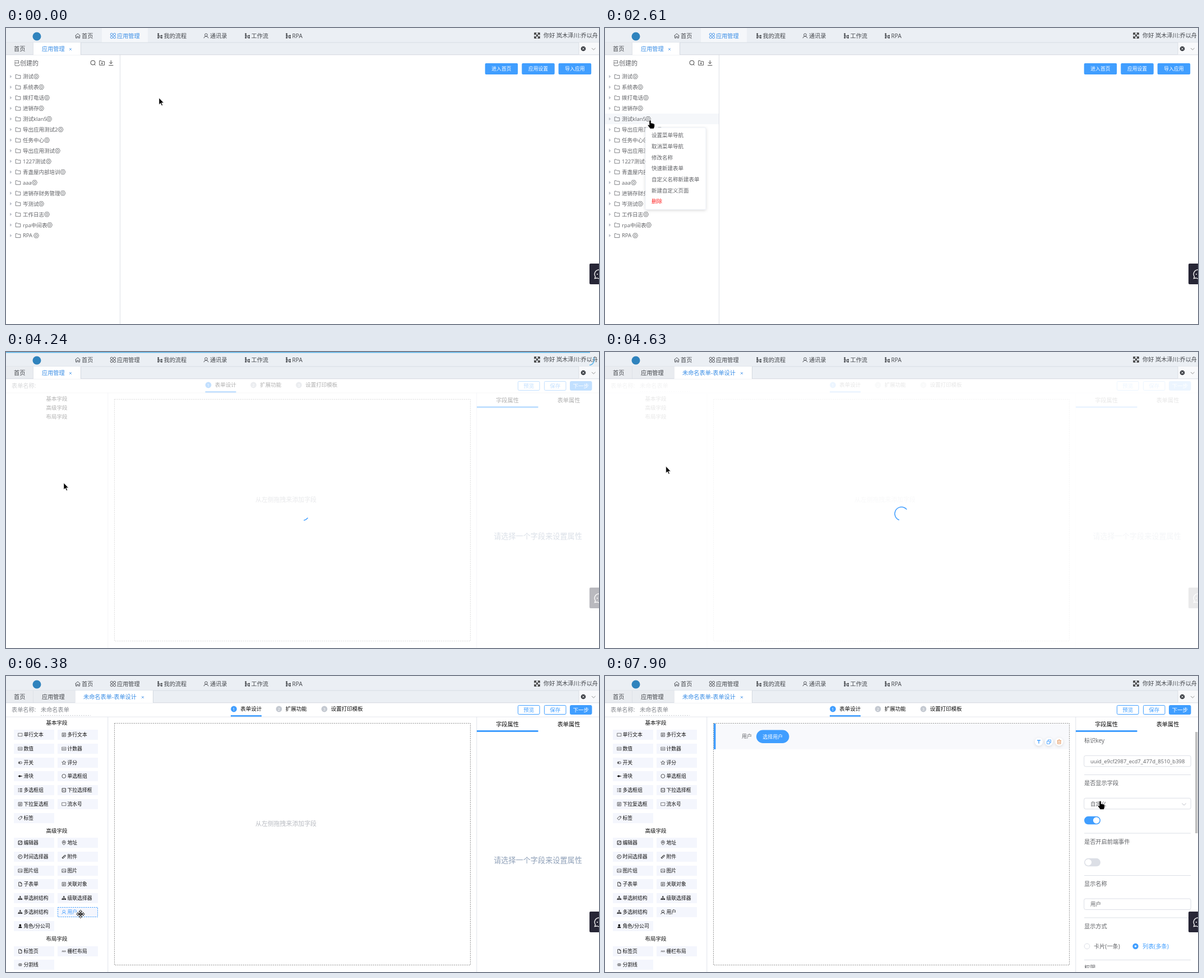
Animation of 1058x529 px, one loop 8 s. Source, as an HTML page:

```html
<!DOCTYPE html>
<html lang="zh-CN">
<head>
<meta charset="utf-8">
<title>表单设计</title>
<style>
html,body{margin:0;width:100%;height:100%;overflow:hidden;background:#fff}
svg{display:block;width:100%;height:100%;font-family:"Open Sans","Noto Sans CJK SC","Noto Sans CJK",sans-serif}
text{fill:currentColor;white-space:pre}
.nav{color:#44474c}
.nav.on{color:#3a8ee6}
.chip{color:#111}
.chip .bg{stroke:#f4f6fd}
.chip.on{color:#409eff}
.chip.on .bg{stroke:#409eff;stroke-dasharray:2.3 1.5}
.item{color:#606266}
.item.on{color:#66b1ff}
.item.red{color:#f22}
</style>
</head>
<body>
<svg id="stage" viewBox="0 0 1058 529" preserveAspectRatio="none"></svg>
<script>
const BLUE = '#409eff', LINE = '#dcdfe6', GREY = '#606266', INK = '#0c0c0c';
const $ = id => document.getElementById(id);

// ---------- drawing helpers ----------
const text = (x, mid, size, str, color = 'currentColor', extra = '') =>
  `<text x="${x}" y="${mid + size * .37}" font-size="${size}" style="fill:${color}" ${extra}>${str}</text>`;
const center = (x, mid, size, str, color) => text(x, mid, size, str, color, 'text-anchor="middle"');
const rect = (x, y, w, h, fill, extra = '') =>
  `<rect x="${x}" y="${y}" width="${w}" height="${h}" fill="${fill}" ${extra}/>`;
const box = (x, y, w, h, r, stroke = LINE) => rect(x, y, w, h, '#fff', `rx="${r}" stroke="${stroke}"`);
const path = (d, stroke = 'currentColor', width = .9, extra = 'fill="none"') =>
  `<path d="${d}" stroke="${stroke}" stroke-width="${width}" ${extra}/>`;
const dot = (x, y, r, fill = 'currentColor', extra = '') =>
  `<circle cx="${x}" cy="${y}" r="${r}" fill="${fill}" ${extra}/>`;
const ring = (x, y, r, color = 'currentColor', w = .9) => dot(x, y, r, 'none', `stroke="${color}" stroke-width="${w}"`);
const group = (id, body, extra = '') => `<g id="${id}" ${extra}>${body}</g>`;
const at = (x, y, body, extra = '') => `<g transform="translate(${x} ${y})" ${extra}>${body}</g>`;
const hline = (x1, x2, y, color = LINE) => rect(x1, y, x2 - x1, 1, color);
const vline = (x, y1, y2, color = LINE) => rect(x, y1, 1, y2 - y1, color);
const cross = (x, y, color) => path(`M${x - 2} ${y - 2}l4 4m0-4l-4 4`, color, .8);

// ---------- icons, centred on 0,0 ----------
const frame = path('M-4-3H4V3H-4Z', undefined, .6);
const icons = {
  box: frame,
  lines: path('M-3.5-3.5H3.5V3.5H-3.5ZM-2-1.5H2M-2 .5H2M-2 2H1', undefined, .7),
  num: frame + path('M-2-1V1.4M0-1V1.4M2-1V1.4', undefined, .7),
  toggle: path('M-1.5-2H1.5A2 2 0 0 1 1.5 2H-1.5A2 2 0 0 1-1.5-2Z', undefined, .7) + ring(-1.5, 0, 1),
  star: path('M0-4L1.1-1.3L4-1.1L1.8.8L2.5 3.6L0 2.1L-2.5 3.6L-1.8.8L-4-1.1L-1.1-1.3Z', undefined, .7),
  slide: path('M-4 0H4', undefined, 1.3) + dot(-1, 0, 2),
  ring: ring(0, 0, 3.8, undefined, .8),
  list: path('M-4-3H-2.5M-4 0H-2.5M-4 3H-2.5M-1-3H4M-1 0H4M-1 3H4', undefined, 1.1),
  pick: path('M-3.5-3.5H3.5V3.5H-3.5ZM-2-.8L0 1.2L2-.8'),
  tag: path('M-3.8.5L.5-3.5H3.5V-.5L-.8 3.6Z', undefined, .8) + dot(2, -2, .6),
  pen: path('M-3.5-3.5H3.5V3.5H-3.5ZM-1.8 2L2-2', undefined, 1.1),
  pin: path('M0 4.4C-5 0-3.4-4.4 0-4.4S5 0 0 4.4Z', undefined, .8) + ring(0, -1, 1.3),
  clock: ring(0, 0, 4) + path('M0-2.4V.3H-2.2'),
  clip: path('M-3.5 2L1.5-3Q3.5-3.6 3.4-1.4L-1 3Q-3 4-3.5 2L1-1.6', undefined, 1.1),
  image: path('M-3.8-3.2H3.8V3.2H-3.8ZM-3 2L-.8-.5L.8 1L2 0L3.4 2', undefined, .7),
  page: path('M-2.8-3.8H1L3-1.6V3.8H-2.8ZM1-3.8V-1.6H3'),
  tree: path('M0-3V0M-3 2.5V0H3V2.5M0 0V2.5', undefined, .8) +
    [[0, -3], [-3, 2.4], [0, 2.4], [3, 2.4]].map(p => rect(p[0] - 1.2, p[1] - 1, 2.4, 2, 'currentColor')).join(''),
  user: ring(0, -1.6, 2.4) + path('M-4 4.2Q-3.4.8 0 .8T4 4.2', undefined, .9),
  man: dot(0, -1.7, 2.1) + path('M-3.6 3.6Q-3.2.6 0 .6T3.6 3.6Z', 'none', 0, 'fill="currentColor"'),
  grid: path('M-4 1.5L-2.7-1.5L-1.4 1.5L0-1.5L1.3 1.5L2.6-1.5L4 1.5', undefined, .5),
  rule: path('M-3-2H3M-4 0H4M-3 2H3', undefined, .8),
  home: path('M-4.6 0L0-4L4.6 0M-3.4-.8V4H-1.2V1H1.2V4H3.4V-.8'),
  apps: [-2.6, 2.6].map(x => [-2.6, 2.6].map(y => ring(x, y, 2.1)).join('')).join(''),
  flow: path('M-2.8-3V3.2M-2.8 0H3M0 0V3.2H3', undefined, .8) +
    [[-2.8, -3.3], [-2.8, 0], [-2.8, 3.4], [3.2, 0], [3.2, 3.4]].map(p => dot(p[0], p[1], 1.45)).join(''),
  folder: path('M-4.3-3.4H-1.3L-.3-2.2H4.3V3.6H-4.3Z', '#606266', .8),
  gear: path('M-4.6 0L-2.4-4H2.4L4.6 0L2.4 4H-2.4Z', '#606266', .8) + ring(0, 0, 2, '#606266', .8)
};

// ---------- top bar ----------
const navs = [['home', 128, '首页'], ['apps', 191, '应用管理'], ['flow', 274.5, '我的流程'],
  ['user', 357, '通讯录'], ['flow', 430.5, '工作流'], ['flow', 503.5, 'RPA']];
const topBar = rect(0, 0, 1058, 48, '#ebeff4') + rect(171, 0, 82, 26, '#f5f7fa', 'id="navBg"') +
  dot(55, 15, 7.5, '#2f83bd') +
  navs.map(([k, x, s], i) => group('nav' + i, at(x, 14, icons[k]) + text(x + 7, 14, 10.2, s), 'class="nav"')).join('') +
  path('M943.5 9.5l8 8m0-8l-8 8M943 12.5V9h3.5M952 12.5V9h-3.5M943 14.5V18h3.5M952 14.5V18h-3.5', '#333', 1.4) +
  text(959, 13.5, 10.2, '你好 岚木泽川:乔以舟', '#44474c');

const tab = (x, w, s, tx, on) => rect(x, 26, w, on ? 22 : 21, on ? '#fff' : '#e9ecf0') +
  vline(x + w - .5, 26, 48, '#d3d8e0') + text(tx, 37.5, 10.2, s, on ? '#3a8ee6' : '#44474c');
const tabs = hline(0, 1058, 25.5, '#d8dde5') + hline(0, 1058, 47.3, '#d3d8e0') + tab(0, 49, '首页', 14) +
  group('tabApp', tab(49, 84.5, '应用管理', 64, true) + cross(115, 38, '#3a8ee6')) +
  group('tabForm', tab(49, 74.5, '应用管理', 64) + tab(123.5, 139, '未命名表单-表单设计', 138, true) + cross(244, 38, '#3a8ee6')) +
  rect(1022, 26, 36, 21.3, '#f8f9fb') + vline(1021.5, 26, 47) +
  dot(1030, 37, 4.3, '#3c3f45') + cross(1030, 37, '#fff') + path('M1045 36l3.3 3l3.3-3', '#888');

// ---------- application list ----------
const ROW = 18.95, ROW0 = 86.7;
const rows = [['测试', 54], ['系统表', 63], ['拨打电话', 73], ['进销存', 63], ['测试klan5', 77], ['导出应用测试2', 97.5],
  ['任务中心', 73], ['导出应用测试', 92], ['1227测试', 76], ['青盏屋内部培训', 101.5], ['aaa', 51], ['进销存财务管理', 101.5],
  ['岑测试', 63], ['工作日志', 73], ['rpa中间表', 78], ['RPA', 54]];
const solid = (x, s) => rect(x, 63, 58.5, 20, BLUE, 'rx="2"') + center(x + 29.2, 73, 8.8, s, '#fff');
const appPage = text(14, 62.5, 11, '已创建的', GREY) +
  ring(155, 62, 4, '#444', 1) + path('M157.8 65l1.6 1.8', '#444', 1) +
  path('M166.8 58.5h3l1 1.3h4.8v6.5h-8.8zM171.2 61.3v3.6M169.4 63.1h3.6', '#444') +
  path('M187.3 57.8v6m-2.8-2.6l2.8 2.8l2.8-2.8M183.2 66.8h8.2', '#444', 1) +
  rect(0, 0, 203, ROW, '#f5f7fa', 'id="rowBg"') +
  rows.map(([s, gx], i) => {
    const y = ROW0 + i * ROW;
    return `<path d="M7 ${y - 2.8}l3.6 2.8l-3.6 2.8z" fill="#c0c4cc"/>` + at(21.5, y, icons.folder) +
      text(30, y, 9.5, s, GREY) + at(gx, y, icons.gear);
  }).join('') + vline(203, 48, 529) + solid(854.7, '进入首页') + solid(920.3, '应用设置') + solid(985.7, '导入应用');

const ITEM = 19.7, ITEM0 = 191.7;
const items = ['设置菜单导航', '取消菜单导航', '修改名称', '快速新建表单', '自定义名称新建表单', '新建自定义页面', '删除'];
const menu = rect(72, 178, 108, 146.5, '#fff', 'rx="2" stroke="#ebeef5" filter="url(#soft)"') +
  rect(72.5, 0, 107, ITEM, '#ecf5ff', 'id="itemBg"') +
  items.map((s, i) => `<g class="item${i == 6 ? ' red' : ''}">${text(83, ITEM0 + i * ITEM, 9.5, s)}</g>`).join('');

// ---------- form designer ----------
const sections = [
  ['基本字段', 83, 105, 'box 单行文本 lines 多行文本 num 数值 num 计数器 toggle 开关 star 评分 slide 滑块 ring 单选框组 list 多选框组 pick 下拉选择框 lines 下拉复选框 box 流水号 tag 标签'],
  ['高级字段', 276, 298.2, 'pen 编辑器 pin 地址 clock 时间选择器 clip 附件 image 图片组 image 图片 page 子表单 lines 关联对象 tree 单选树结构 tree 级联选择器 tree 多选树结构 user 用户 man 角色/分公司'],
  ['布局字段', 469, 491.6, 'page 标签页 grid 栅栏布局 rule 分割线']
];
const chips = [];
for (const [, , y0, list] of sections) {
  const w = list.split(' ');
  for (let i = 0; i < w.length; i += 2)
    chips.push({ icon: w[i], name: w[i + 1], x: i / 2 % 2 ? 92.5 : 14.5, y: Math.round(y0 + (i >> 2) * 24.75 - 9) + .5 });
}
const chipArt = c => rect(c.x, c.y, 71, 17, '#f4f6fd', 'class="bg"') +
  at(c.x + 10.8, c.y + 8.5, `<g transform="scale(.9)">${icons[c.icon]}</g>`) + text(c.x + 17, c.y + 8.7, 8.8, c.name);

const step = (x, n, s, on) => dot(x, 59, 5.4, on ? BLUE : '#c3c8d0') + center(x, 59, 7.5, n, '#fff') +
  text(x + 11.7, 58.8, 9.5, s, INK);
const small = (x, s, fill, color) => rect(x, 52.5, 38.5, 16, fill, `rx="2" stroke="${BLUE}"`) + center(x + 19.2, 60, 9.5, s, color);
const designer = rect(0, 48, 1058, 481, '#fff') + text(10, 60, 10.2, '表单名称:', '#85888e') +
  group('formName', text(62, 60, 10.2, '未命名表单', '#85888e') + path('M62 70.5H151', '#c4c8cf', .9, 'stroke-dasharray="2 2"')) +
  group('steps', step(406.5, '1', '表单设计', true) + step(487, '2', '扩展功能') + step(568, '3', '设置打印模板') +
    rect(401, 70, 55, 3, BLUE)) +
  small(913.5, '预览', '#fff', BLUE) + small(960.5, '保存', '#fff', BLUE) + small(1006.5, '下一步', BLUE, '#fff') +
  hline(0, 1058, 72.6, '#e4e7ed') + vline(181.3, 73, 529, '#e0e3ea') + vline(839.3, 73, 529, '#e0e3ea') +
  sections.map((s, i) => group('sec' + i, center(90.5, 0, 9.5, s[0], INK))).join('') +
  group('chips', chips.map(c => `<g class="chip">${chipArt(c)}</g>`).join('')) +
  rect(193.5, 84.5, 635, 432, 'none', 'stroke="#999" stroke-dasharray="2.3 1.5"') +
  group('hint', center(499.5, 264, 10.9, '从左侧拖拽来添加字段', '#b9bcc2')) +
  center(894.5, 86, 10.2, '字段属性', INK) + center(1004, 86, 10.2, '表单属性', INK) +
  rect(840, 97, 109.5, 3, BLUE) + group('empty', center(949, 329.5, 13.15, '请选择一个字段来设置属性', '#8fa0b8')) +
  rect(194, 85.5, 634, 3, '#f56c6c', 'id="slot"');

// ---------- dropped field and its properties ----------
const tool = (x, body) => dot(x, 117.5, 7, '#fff', 'filter="url(#soft)"') + at(x, 117.5, body);
const field = rect(194, 85, 634, 46, '#f8f9fc') + rect(194, 85, 3.5, 46, BLUE) + text(244, 108, 9, '用户', GREY) +
  rect(270, 96.5, 58.5, 23.5, BLUE, 'rx="11.7"') + center(299.3, 108.3, 9, '选择用户', '#fff') +
  group('tools', tool(774, path('M-3-2.5H3M0-2.5V3.2', BLUE, 1.3)) +
    tool(792, path('M-3.5-1H1.5V3.8H-3.5ZM-1.5-1V-3.5H3.5V1.5H1.5', BLUE, .9)) +
    tool(810.3, path('M-3.6-2.2H3.6M-1.2-3.6H1.2M-2.7-2.2V3.6H2.7V-2.2M-.9-.4V2M.9-.4V2', '#e08a4a', .9)));
const label = (y, s) => text(855, y, 10.2, s, GREY);
const input = (y, s) => box(854.7, y + .3, 190.5, 19.5, 3) + text(866, y + 10, 9.5, s, GREY);
const flip = (y, on) => rect(855, y, 29, 14.5, on ? BLUE : '#dcdfe6', 'rx="7.2"') + dot(on ? 876.7 : 862.3, y + 7.2, 5.8, '#fff');
const props = label(115, '标识key') + input(142, 'uuid_e9cf2987_ecd7_477d_8510_b398') + label(191, '是否显示字段') +
  input(218, '自定义') + path('M1029.5 227.5l3.6 3.5l3.6-3.5', '#b4b8c0') + flip(250.8, true) +
  label(296, '是否开启前端事件') + flip(325.8) + label(371, '显示名称') + input(397.7, '用户') + label(447, '显示方式') +
  ring(860, 483, 4.8, LINE, 1) + text(872, 483.3, 10.2, '卡片(一条)', GREY) +
  dot(946.5, 483, 5.2, BLUE) + dot(946.5, 483, 1.8, '#fff') + text(959, 483.3, 10.2, '列表(多条)', BLUE) + label(521.5, '权限') +
  [176, 280.5, 356, 431.5, 507].map(y => hline(855, 1045, y)).join('') + rect(1053, 100, 4.3, 181, '#c1c1c1');

const chat = rect(1041, 421, 20, 37, '#272636', 'rx="2"') +
  path('M1058 432.2A7.8 7.8 0 0 0 1051.6 444.5L1050.4 447.6L1054.6 446.8Q1056 447.8 1058 447.8', '#fff', 1.3) +
  dot(1055, 440, 1.1, '#fff');

const cursors = group('arrow', path('M0 0V12L2.8 9.4L4.8 13.8L6.6 13L4.6 8.8H8.4Z', '#fff', .6, 'fill="#000"')) +
  group('hand', path('M-1.6 1.2Q0-.7 1.6 1.2V5.6Q3 4.8 4 6Q5.5 5.4 6.3 6.8Q7.8 6.4 8 8V11Q7.6 13 6.5 15.5H0Q-1.5 13-4 10Q-4.6 7.8-2.6 8.4L-1.6 9.4Z', '#fff', .6, 'fill="#000"')) +
  group('move', path('M0-7.3L2.8-4.4H1V-1H4.4V-2.8L7.3 0L4.4 2.8V1H1V4.4H2.8L0 7.3L-2.8 4.4H-1V1H-4.4V2.8L-7.3 0L-4.4-2.8V-1H-1V-4.4H-2.8Z', '#111', 1, 'fill="#fff"') + path('M-3.5 0H3.5M0-3.5V3.5', '#111', .8));

const userChip = chips.find(c => c.name == '用户');
$('stage').innerHTML = `<defs>
<filter id="soft" x="-50%" y="-50%" width="200%" height="200%"><feDropShadow dx="0" dy="1.4" stdDeviation="2.4" flood-color="#000" flood-opacity=".14"/></filter>
<clipPath id="view"><rect x="840" y="100" width="218" height="422"/></clipPath></defs>` +
  rect(0, 0, 1058, 529, '#fff') + group('appPage', appPage) + group('designer', designer) +
  group('field', field) + group('props', props, 'clip-path="url(#view)"') + chat + group('menu', menu) +
  group('mask', rect(0, 48, 1058, 481, '#fff', 'id="veil"') +
    `<circle id="spin" cx="529" cy="289" r="12" fill="none" stroke="${BLUE}" stroke-width="1.5" stroke-linecap="round"/>`) +
  topBar + tabs +
  group('progress', rect(0, 0, 1058, 1.5, '#5cb5ea', 'id="bar"') +
    path('M1048 10A9 9 0 0 1 1041 23.5', '#5cb5ea', 1.5, 'id="whirl" fill="none"')) +
  group('drag', chipArt(userChip), 'class="chip" opacity=".6"') + group('cursor', cursors);

const chipEls = [...document.querySelectorAll('#chips .chip')];
const itemEls = [...document.querySelectorAll('.item')];

// ---------- time ----------
// start, end and number of picture changes in each burst
const bursts = [[70, 810, 10], [890, 1360, 7], [1580, 1820, 4], [2280, 2610, 5], [2890, 3440, 8], [3820, 4550, 10],
  [4630, 4710, 2], [4860, 5620, 11], [5700, 5920, 4], [6380, 6900, 7], [7120, 7240, 2], [7510, 7900, 6]];
function snap(t) {
  let s = 0;
  for (const [a, b, n] of bursts) {
    const d = (b - a) / (n - 1);
    if (t >= a) s = Math.min(b, a + Math.floor((t - a) / d + 1e-6) * d);
  }
  return s;
}
const way = [[0, 273, 125], [230, 240, 104], [480, 201, 91], [810, 182, 102], [1203, 89.5, 163], [1360, 80, 162.5],
  [1500, 80, 162.5], [1660, 73, 163.5], [1820, 80.5, 164.5], [2810, 80.5, 164.5], [3440, 104, 250], [3900, 104, 250],
  [4225, 103, 234], [4550, 107, 212], [4780, 112, 190], [5012, 127.5, 131.5], [5620, 131, 438], [5920, 133, 425.5],
  [6380, 133, 425.5], [6900, 325, 145], [7430, 325, 145], [7510, 365, 151], [7900, 883.5, 223]];
function place(t) {
  const i = way.findIndex(k => k[0] > t);
  if (i < 0) return way[way.length - 1].slice(1);
  const a = way[i - 1], b = way[i], p = (t - a[0]) / (b[0] - a[0]);
  return [a[1] + (b[1] - a[1]) * p, a[2] + (b[2] - a[2]) * p];
}
const clamp = v => Math.max(0, Math.min(1, v));
const show = (id, on) => { $(id).style.display = on ? '' : 'none'; };
const set = (id, name, v) => $(id).setAttribute(name, v);

function draw(time) {
  const t = snap(time), [x, y] = place(t);
  const design = t >= 4060, tabOpen = t >= 4630, loaded = t >= 4700, dropped = t >= 7120;
  const dragging = t > 6400 && !dropped;

  // application list and its menu
  const open = Math.min(clamp((t - 2200) / 300), clamp((4040 - t) / 300));
  const inMenu = open > 0 && x > 72 && x < 180 && y > 178 && y < 324;
  const row = Math.floor((y - ROW0) / ROW + .5);
  const onRow = !design && !inMenu && x < 203 && row >= 0 && row < rows.length;
  const item = inMenu ? Math.floor((y - ITEM0) / ITEM + .5) : -1;
  show('appPage', !design);
  show('rowBg', onRow);
  set('rowBg', 'y', ROW0 + (row - .5) * ROW);
  show('menu', open > 0);
  set('menu', 'opacity', open);
  set('menu', 'transform', `translate(0 ${178 * (1 - open)}) scale(1 ${open || 1})`);
  show('itemBg', item >= 0);
  set('itemBg', 'y', ITEM0 + (item - .5) * ITEM);
  itemEls.forEach((el, i) => el.classList.toggle('on', i == item));

  // tabs and page loading
  show('navBg', !design);
  $('nav1').classList.toggle('on', !design);
  show('tabApp', !tabOpen);
  show('tabForm', tabOpen);
  const fade = Math.min(clamp((t - 4000) / 300), clamp((5010 - t) / 200));
  show('mask', design && fade > 0);
  set('veil', 'opacity', .9 * fade);
  const grow = clamp((t - 4030) / 700);
  set('spin', 'stroke-dasharray', `${54 * grow ** 1.6 + .5} 200`);
  set('spin', 'transform', `rotate(${(t - 4030) * .18 + 5} 529 289)`);
  show('progress', t > 3890 && t < 4540);
  set('progress', 'opacity', clamp((4560 - t) / 150));
  set('bar', 'width', 1042 * clamp((t - 3850) / 370) + (t > 4300 ? 16 : 0));
  set('whirl', 'transform', `rotate(${(t - 4225.6) * .9} 1040 14.5)`);

  // designer
  show('designer', design);
  show('formName', tabOpen);
  set('steps', 'transform', `translate(${tabOpen ? 0 : -45.5} 0)`);
  sections.forEach((s, i) => set('sec' + i, 'transform', `translate(0 ${loaded ? s[1] : 83 + 16 * i})`));
  show('chips', loaded);
  let onChip = false;
  chips.forEach((c, i) => {
    const on = loaded && !dragging && x > c.x && x < c.x + 71 && y > c.y && y < c.y + 17;
    onChip = onChip || on;
    chipEls[i].classList.toggle('on', on);
  });
  show('hint', !dropped);
  show('empty', !dropped);
  show('slot', dragging && x > 194);
  show('field', dropped);
  show('tools', t >= 7240);
  show('props', dropped);
  show('drag', dragging);
  set('drag', 'transform', `translate(${x - 133} ${y - 425.5})`);

  // pointer
  const onSelect = dropped && x > 855 && x < 1045 && y > 218 && y < 238;
  const kind = onChip ? 'move' : onRow || inMenu || onSelect ? 'hand' : 'arrow';
  ['arrow', 'hand', 'move'].forEach(k => show(k, k == kind));
  set('cursor', 'transform', `translate(${x} ${y})`);
}

const begin = performance.now();
function tick() {
  draw((performance.now() - begin) % 8000);
  requestAnimationFrame(tick);
}
tick();
</script>
</body>
</html>
```
